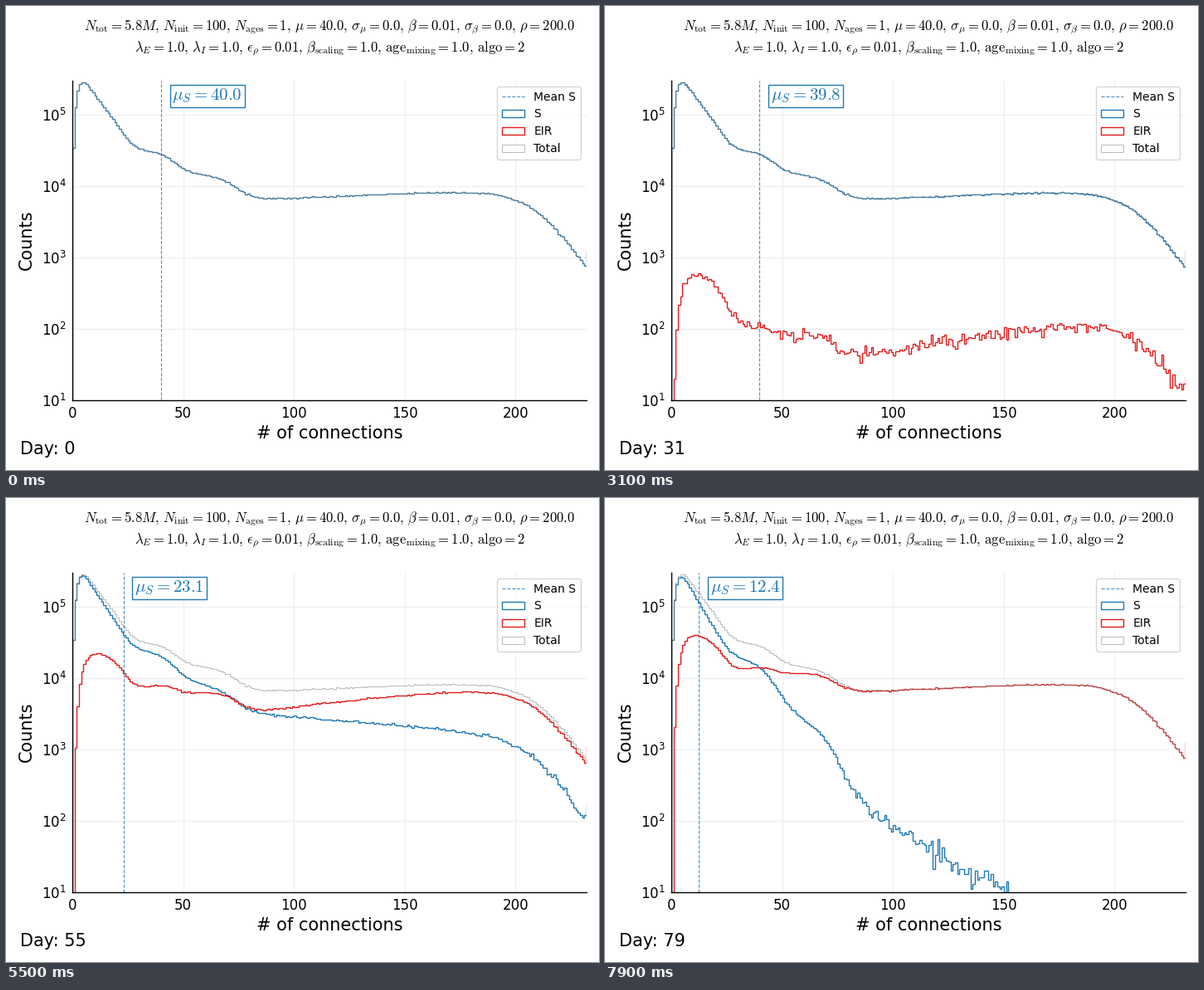
Animation, 715 px wide and 559 px high, one loop 8 s. Source, as a matplotlib script:

```python
import numpy as np
import matplotlib.pyplot as plt
from matplotlib.animation import FuncAnimation
from matplotlib.lines import Line2D
from matplotlib.patches import Patch

W, H, DPI = 715, 559, 100
DAYS = 80
MU = 40
BLUE, RED, GREY = "#1f78b4", "#e31a1c", "#808080"

plt.rcParams["font.family"] = "DejaVu Sans"
plt.rcParams["mathtext.fontset"] = "cm"

k = np.arange(233)  # connections per person


def sigmoid(x):
    return 1 / (1 + np.exp(-x))


def population():
    """Mean counts of four groups: core, two shoulders and the wide plateau."""
    rise = 1 - np.exp(-0.21 * (k + 0.1) ** 1.5)
    core = 490e3 * rise * np.exp(-0.115 * k) * sigmoid((24 - k) / 3)
    near = 18.5e3 * sigmoid((44 - k) / 4)
    mid = 8.4e3 * sigmoid((71.5 - k) / 4.2)
    wide = (4750 + 21.2 * k) * sigmoid((208 - k) / 9.4)
    wide[-1] *= 1.8  # the last bin collects the tail
    return np.array([core, near, mid, wide])


def hazard(day):
    """Cumulative infection hazard of each group, logistic in time."""
    def spread(top, middle, rate):
        return top * sigmoid(rate * (day - middle)) * k

    return np.array([
        spread(0.0270, 54.5, 0.182) * (k / 12) ** 0.2,
        spread(0.0095, 50.5, 0.230),
        spread(0.0240, 56.0, 0.215),
        spread(0.0458, 62.0, 0.207),
    ])


def simulate():
    """Susceptible counts per connection number, for every day."""
    rng = np.random.default_rng(7)
    left = rng.poisson(population())
    days = [left.sum(axis=0)]
    for day in range(1, DAYS):
        step = hazard(day) - hazard(day - 1)
        left = left - rng.binomial(left, 1 - np.exp(-step))
        days.append(left.sum(axis=0))
    return days


def mean_degree(counts):
    return np.average(k, weights=counts)


def visible(counts):
    return np.maximum(counts, 1)


susceptible = simulate()
total = susceptible[0]

fig = plt.figure(figsize=(W / DPI, H / DPI), dpi=DPI, facecolor="white")
ax = fig.add_axes([80 / W, 84 / H, 620 / W, 385 / H])


def label(x, y, s, size, **kw):
    return fig.text(x / W, 1 - y / H, s, fontsize=size, va="baseline", **kw)


ax.set_yscale("log")
ax.set_xlim(0, 232)
ax.set_ylim(10, 3e5)
ax.set_xticks(range(0, 201, 50))
ax.set_axisbelow(True)
ax.grid(True, color="#f0f0f0", lw=1)
ax.tick_params(which="both", length=0, pad=5, labelsize=12)
ax.spines[["top", "right"]].set_visible(False)
ax.spines[["left", "bottom"]].set_linewidth(1)

sep = r", \, "
line1 = sep.join([
    r"N_\mathrm{tot} = 5.8M", r"N_\mathrm{init} = 100", r"N_\mathrm{ages} = 1",
    r"\mu = 40.0", r"\sigma_\mu = 0.0", r"\beta = 0.01",
    r"\sigma_\beta = 0.0", r"\rho = 200.0"])
line2 = sep.join([
    r"\lambda_E = 1.0", r"\lambda_I = 1.0", r"\epsilon_\rho = 0.01",
    r"\beta_\mathrm{scaling} = 1.0", r"\mathrm{age}_\mathrm{mixing} = 1.0",
    r"\mathrm{algo} = 2"])
label(390.5, 29.5, f"${line1}$", 12, ha="center")
label(390.5, 55.5, f"${line2}$", 12, ha="center")
label(390.5, 521, "# of connections", 15, ha="center")
label(31, 282, "Counts", 15, ha="center", rotation=90, rotation_mode="anchor")
day_text = label(17, 540, "", 15, ha="left")

s_style = dict(color=BLUE, lw=1)
eir_style = dict(color=RED, lw=1)
total_style = dict(color=GREY, lw=0.5, alpha=0.75)
mean_style = dict(color=BLUE, lw=0.8, ls="--", alpha=0.8)


def outline(style, z):
    return ax.stairs(visible(total), np.arange(234), baseline=1, zorder=z, **style)


s_hist = outline(s_style, 2)
eir_hist = outline(eir_style, 2.1)
outline(total_style, 2.2)

mean_line = ax.axvline(MU, zorder=2.3, **mean_style)
mean_text = ax.text(MU, 0.952, "", transform=ax.get_xaxis_transform(),
                    fontsize=15, color=BLUE, ha="left", va="center",
                    bbox=dict(facecolor="white", edgecolor=BLUE, pad=2))


def key(name, color, **style):
    return Patch(fill=False, edgecolor=color, label=name, **style)


ax.legend(handles=[Line2D([], [], label="Mean S", **mean_style),
                   key("S", **s_style), key("EIR", **eir_style),
                   key("Total", **total_style)],
          loc="upper right", fontsize=10)


def update(day):
    s = susceptible[day]
    mu = MU * mean_degree(s) / mean_degree(total)
    s_hist.set_data(values=visible(s))
    eir_hist.set_data(values=visible(total - s))
    mean_line.set_xdata([mu, mu])
    mean_text.set_x(mu + 5)
    mean_text.set_text(rf"$\mu_S = {mu:.1f}$")
    day_text.set_text(f"Day: {day}")
    return s_hist, eir_hist, mean_line, mean_text, day_text


anim = FuncAnimation(fig, update, frames=DAYS, interval=100, repeat=True)
plt.show()
```
